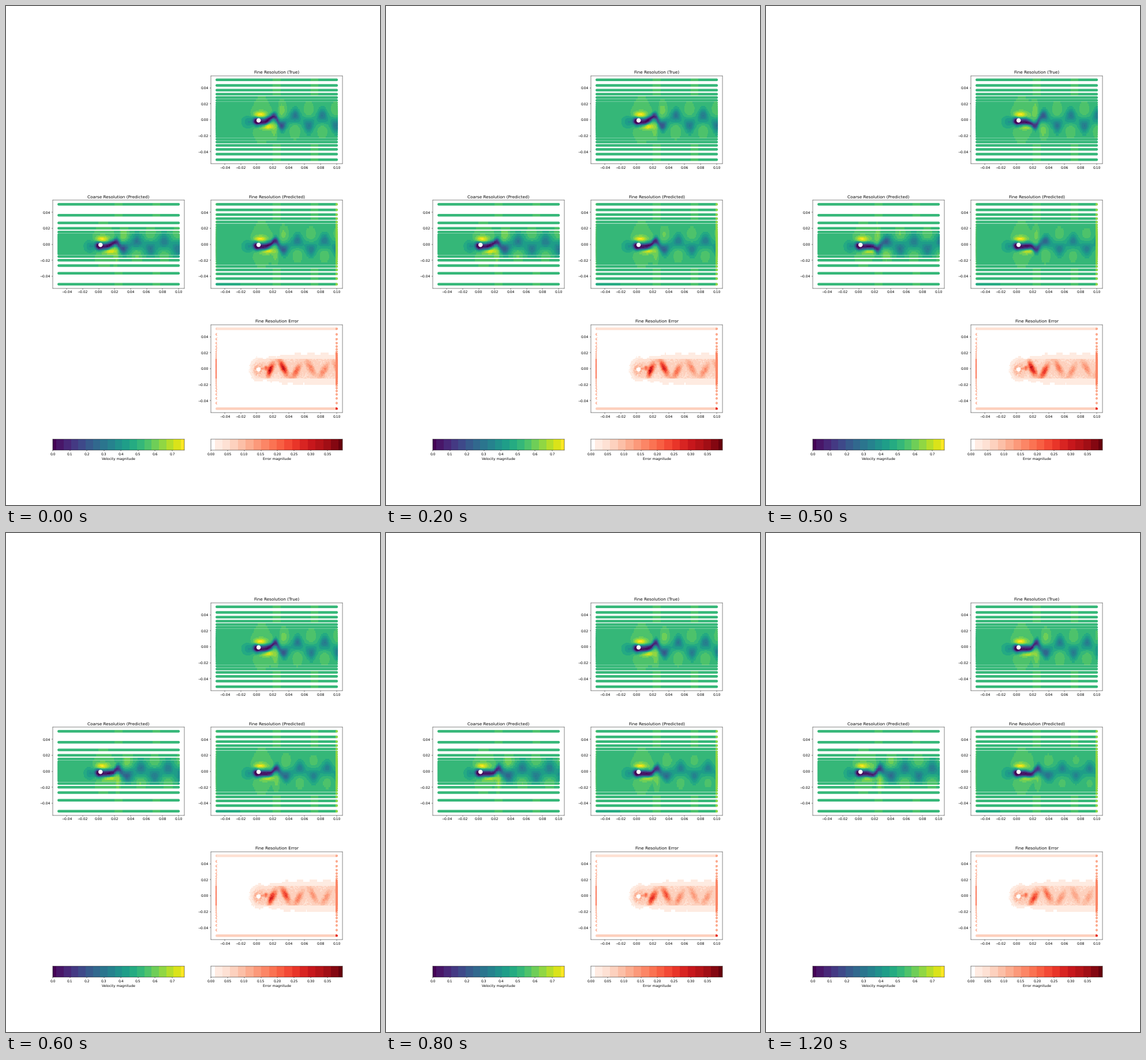
A matplotlib script for the animation above (1250 ms loop, 648 by 864 pixels).

```python
import numpy as np
import matplotlib
import matplotlib.pyplot as plt
from matplotlib.animation import FuncAnimation

plt.rcParams["text.hinting"] = "none"

FRAMES, INTERVAL = 25, 50
X0, X1, Y0, Y1 = -0.0575, 0.1075, -0.055, 0.055
LEFT, RIGHT = -0.05, 0.1
V_MAX, E_MAX = 0.772, 0.3955
AMBIENT = 0.515
PX = 0.165 / 228.27        # data units per screen pixel
DOT = 2.25 * PX            # marker radius
WAVE = 47 * PX             # length of one vortex pair
K = 2 * np.pi / WAVE
HOLE = (0.0023, -0.0008)


def palette(name, bands):
    colors = matplotlib.colormaps[name](np.linspace(0, 1, bands + 1))
    return colors[:, :3] * 255


VIRIDIS, REDS = palette("viridis", 18), palette("Reds", 17)
REDS[0] = 255


def sigmoid(v):
    return 1 / (1 + np.exp(-np.clip(v, -40, 40)))


def bump(x, y, cx, cy, sx, sy):
    return np.exp(-((x - cx) / sx) ** 2 - ((y - cy) / sy) ** 2)


def mesh_rows(gap, ratio, core, pitch):
    """Rows that crowd towards the centre, then stay evenly dense."""
    outer, y = [], 0.05
    while y > core:
        outer.append(y)
        y -= gap
        gap *= ratio
    inner = np.arange(-y, y + pitch / 2, pitch)
    return np.concatenate([-np.array(outer), inner, outer[::-1]])


class Panel:
    """Field of overlapping round markers on a graded mesh."""

    def __init__(self, cell, title, rows, n_cols, colors, top):
        self.colors, self.top = colors, top
        cols = np.linspace(LEFT, RIGHT, n_cols)
        self.x, self.y = np.meshgrid(cols, rows)

        ax = fig.add_subplot(cell, facecolor="none", aspect="equal",
                             xlim=(X0, X1), ylim=(Y0, Y1))
        ax.set_title(title)
        ax.set_xticks(np.arange(-2, 6) * 0.02)
        ax.set_yticks(np.arange(-2, 3) * 0.02)
        ax.xaxis.set_major_formatter("{x:.2f}")
        ax.yaxis.set_major_formatter("{x:.2f}")
        ax.apply_aspect()

        # screen pixels of the plot area, in data units
        box = ax.get_window_extent()
        left, low = int(box.x0), int(box.y0)
        w, h = int(box.x1) - left, int(box.y1) - low
        px = X0 + (left + np.arange(w) + 0.5 - box.x0) * PX
        py = Y0 + (low + np.arange(h)[::-1] + 0.5 - box.y0) * PX

        near = np.abs(py[:, None] - rows).argmin(axis=1)
        dy = (py - rows[near])[:, None]
        over = np.maximum(np.maximum(LEFT - px, px - RIGHT), 0)
        cover = np.clip((DOT - np.hypot(over, dy)) / PX + 0.5, 0, 1)
        gap = np.hypot(px - HOLE[0], py[:, None] - HOLE[1])
        cover *= np.clip((gap - 3.7 * PX) / PX + 0.5, 0, 1)
        self.cover = cover[..., None]

        col = np.abs(px[:, None] - cols[1:-1]).argmin(axis=1) + 1
        col = np.broadcast_to(col, (h, w)).copy()
        second = LEFT + 0.0012
        col[(px < second) & (np.hypot(px - second, dy) > DOT)] = 0
        col[np.hypot(px - RIGHT, dy) < DOT] = n_cols - 1
        self.row, self.col = near[:, None], col
        self.image = fig.figimage(np.full((h, w, 3), 255, np.uint8),
                                  left, low, origin="upper", zorder=-1)

    def show(self, values):
        share = np.clip(values / self.top, 0, 1)
        level = np.rint(share * (len(self.colors) - 1)).astype(int)
        rgb = self.colors[level][self.row, self.col]
        rgb = 255 + (rgb - 255) * self.cover
        self.image.set_data(rgb.astype(np.uint8))


def speed(x, y, crest, swing, width, excess, far, blob):
    """Flow past the cylinder; crest is where the wake swings highest."""
    moving = np.abs(y) < 0.029
    warp = 0.007 * np.exp(-((x - 0.02) / 0.007) ** 2)
    c = np.cos(K * (x - warp - crest))

    # calm outer flow, slightly faster around the cylinder
    ripple = 0.010 + 0.014 * np.cos(K * 0.72 * (x - 0.025))
    v = AMBIENT + ~moving * ripple * sigmoid((x - 0.003) / 0.004)
    v += moving * 0.034 * bump(x, y, 0.006, 0, 0.0155, 0.045)

    # fast flow opposite each vortex
    past = np.maximum(x - 0.022, 0)
    strength = excess * sigmoid((x - 0.021) / 0.003) * (0.55 + 0.8 * np.exp(-past / 0.014))
    low = np.exp(-((y + 0.0135) / 0.0105) ** 2)
    high = np.exp(-((y - 0.0125) / 0.0105) ** 2)
    v += moving * strength * (np.maximum(c, 0) * low + np.maximum(-c, 0) * high)

    # fast shoulders
    v += 0.07 * bump(x, y, 0.007, -0.001, 0.014, 0.012)
    v += 0.19 * bump(x, y, 0.0040, 0.0065, 0.0075, 0.0035)
    v += 0.20 * bump(x, y, 0.0125, -0.0085, 0.0085, 0.0032)

    # meandering slow wake
    center = -0.0030 + 0.0020 * sigmoid((x - 0.018) / 0.004)
    center = center + swing * c * (1 - np.exp(-(np.maximum(x - 0.008, 0) / 0.008) ** 2))
    thick = 0.0048 - 0.0012 * np.exp(-((x - 0.019) / 0.005) ** 2)
    thick = thick + (width - 0.0048) * sigmoid((x - 0.034) / 0.006)
    depth = far + (0.60 - far) * np.exp(-(np.maximum(x - 0.010, 0) / 0.021) ** 2)
    lumps = 1 - blob * (1 - c ** 2) * sigmoid((x - 0.029) / 0.003)
    start = sigmoid((x + 0.001) / 0.0012)
    v -= moving * start * depth * lumps * np.exp(-((y - center) / thick) ** 2)

    # stagnation zone
    v -= 0.14 * bump(x, y, -0.0095, -0.0025, 0.0075, 0.0075)
    v -= 0.42 * bump(x, y, -0.0015, -0.0015, 0.0035, 0.0042)
    return v


def error(x, y, crest, fade):
    inside = (np.abs(y) < 0.0125) * sigmoid((x - 0.003) / 0.003)
    tall = 0.0125 + 0.0075 * sigmoid((x - 0.022) / 0.009)
    tall = tall + 0.0012 * np.cos(2 * K * (x - crest))
    v = 0.030 * np.exp(-((y + 0.0005) / tall) ** 2) * sigmoid((x + 0.004) / 0.002)
    v += inside * (0.020 + 0.030 * grain)

    rise = np.maximum(np.cos(K * (x - crest - 0.45 * y)), 0) ** 3
    fall = np.maximum(-np.cos(K * (x - crest + 0.45 * y)), 0) ** 3
    bars = rise * np.exp(-((y + 0.003) / 0.0090) ** 2)
    bars = bars + fall * np.exp(-((y - 0.001) / 0.0095) ** 2)
    gain = 0.100 + 0.20 * np.exp(-((x - 0.020) / 0.024) ** 2)
    v += inside * fade * gain * bars * sigmoid((x - 0.013) / 0.0015) * (0.8 + 0.35 * grain)

    v += 0.13 * bump(x, y, 0.0115, 0.001, 0.0025, 0.0025)
    v += 0.15 * grain * bump(x, y, 0.001, -0.001, 0.0075, 0.0085)

    # domain boundary
    v[:, 0] = 0.11 + 0.08 * (np.abs(y[:, 0]) < 0.0125)
    v[-1] = 0.040
    v[0] = 0.070
    v[-1, 0], v[0, 0] = 0.06, 0.08
    v[:, -1] = 0.125 + 0.03 * (np.abs(y[:, -1]) < 0.02)
    v[0, -1] = 0.25
    return v


def scale_bar(cell, colors, top, step, fmt, label):
    ax = fig.add_subplot(cell, xlim=(0, top), ylim=(0, 1))
    n = len(colors) - 1
    edges = np.clip((np.arange(n + 2) - 0.5) / n, 0, 1) * top
    ax.bar(edges[:-1], 1, np.diff(edges), align="edge", color=colors / 255,
           antialiased=False)
    ax.set_xticks(np.arange(0, top, step))
    ax.xaxis.set_major_formatter(fmt)
    ax.set_yticks([])
    ax.set_xlabel(label)


fig = plt.figure(figsize=(15, 20), dpi=43.2, facecolor="white")
grid = fig.add_gridspec(4, 2, height_ratios=[1, 1, 1, 0.1])
fine = mesh_rows(0.0070, 0.845, 0.0125, 0.0008)
rough = mesh_rows(0.0137, 0.70, 0.0145, 0.0012)

true = Panel(grid[0, 1], "Fine Resolution (True)", fine, 201, VIRIDIS, V_MAX)
coarse = Panel(grid[1, 0], "Coarse Resolution (Predicted)", rough, 141, VIRIDIS, V_MAX)
pred = Panel(grid[1, 1], "Fine Resolution (Predicted)", fine, 201, VIRIDIS, V_MAX)
err = Panel(grid[2, 1], "Fine Resolution Error", fine, 201, REDS, E_MAX)
scale_bar(grid[3, 0], VIRIDIS, V_MAX, 0.1, "{x:.1f}", "Velocity magnitude")
scale_bar(grid[3, 1], REDS, E_MAX, 0.05, "{x:.2f}", "Error magnitude")

# slightly smoothed speckle
grain = np.random.default_rng(4).random(err.x.shape)
grain = (grain + np.roll(grain, 1, 0) + np.roll(grain, 1, 1)
         + np.roll(grain, (1, 1), (0, 1))) / 4


def crest_at(n, start, drift):
    """Each step advances a quarter wave plus a slow drift (pixels)."""
    return (start + drift * n) * PX + n * WAVE / 4


def update(n):
    age = n / (FRAMES - 1)
    true.show(speed(true.x, true.y, crest_at(n, 66.6, 0.34),
                    0.0062, 0.0082, 0.095, 0.20, 0.72))
    coarse.show(speed(coarse.x, coarse.y, crest_at(n, 66.5, 0.58),
                      0.0045, 0.0092, 0.110, 0.20, 0.55))
    v = speed(pred.x, pred.y, crest_at(n, 70.5, 0.36),
              0.0058 - 0.0016 * age, 0.0080, 0.085 - 0.03 * age,
              0.19 - 0.02 * age, 0.66 - 0.1 * age)
    v[:, -1] = 0.64
    v[:, 0] = 0.54
    v[0, :40] = 0.47
    pred.show(v)
    err.show(error(err.x, err.y, crest_at(n, 70.6, 0.32), 1 - 0.35 * age))
    return [p.image for p in (true, coarse, pred, err)]


anim = FuncAnimation(fig, update, frames=FRAMES, interval=INTERVAL,
                     repeat=True, repeat_delay=0, blit=False)
plt.show()
```
